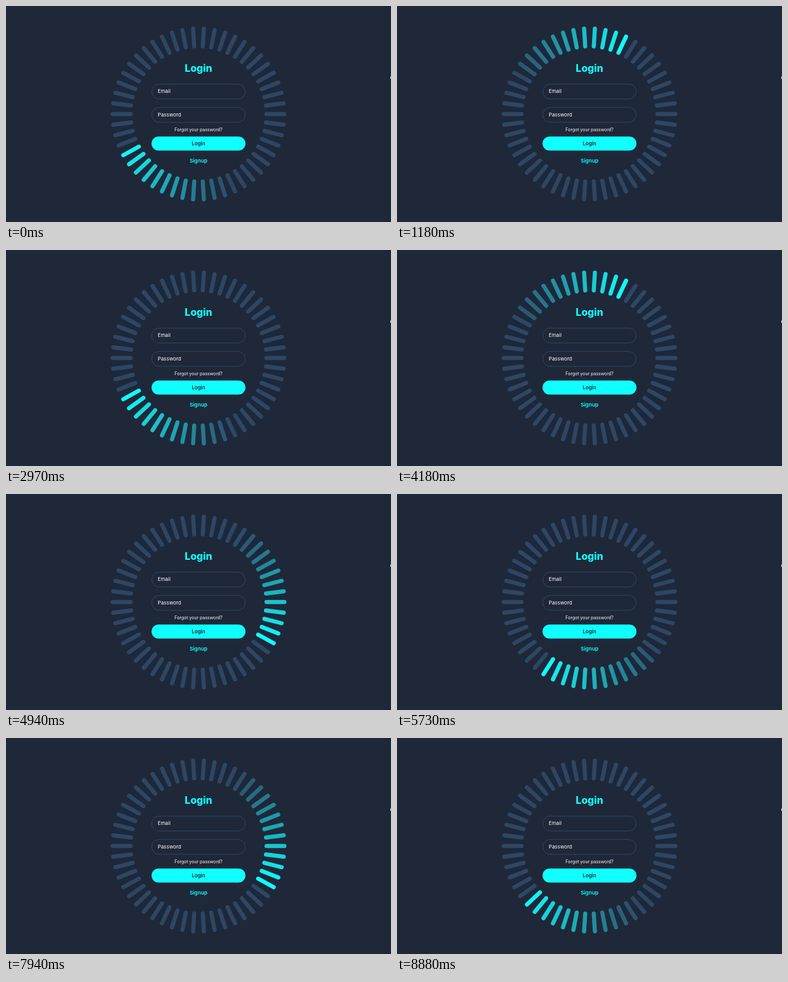
Write an HTML page that moves like this. It is 600x338 px and loops after 8910 ms.

```html
<!DOCTYPE html>
<html lang="en">
<head>
<meta charset="utf-8">
<title>Login</title>
<style>
  html, body { margin: 0; width: 100%; height: 100%; overflow: hidden; background: #1f2838; }
  svg { display: block; width: 100%; height: 100%; }
  text { font-family: Inter, "Open Sans", sans-serif; font-size: 7.9px; fill: #fff; }
  .mid { text-anchor: middle; }
  .title { font-size: 15.6px; font-weight: 800; fill: #10ffff; }
  .field { fill: none; stroke: #2c4766; stroke-width: 1; }
  .hint { font-size: 6.9px; }
  .button { fill: #10ffff; }
  .label { font-size: 7.8px; font-weight: 600; fill: #1f2838; }
  .signup { font-size: 8.2px; font-weight: 600; fill: #10ffff; }
</style>
</head>
<body>
<svg viewBox="0 0 600 338">
  <g id="ring"></g>
  <text class="title mid" x="300" y="103">Login</text>
  <rect class="field" x="227.2" y="122.2" width="145.6" height="23.4" rx="11.7"/>
  <text x="236.4" y="136.3">Email</text>
  <rect class="field" x="227.2" y="158.7" width="145.6" height="23.4" rx="11.7"/>
  <text x="236.4" y="172.8">Password</text>
  <text class="hint mid" x="300" y="196">Forgot your password?</text>
  <rect class="button" x="226.8" y="204.2" width="146.4" height="22" rx="11"/>
  <text class="label mid" x="300" y="217.8">Login</text>
  <text class="signup mid" x="300" y="244.6">Signup</text>
  <ellipse cx="601" cy="112" rx="2" ry="2.8" fill="#fff"/>
</svg>
<script>
  const COUNT = 50;
  const LOOP = 8910;
  const STEP = 60;      // ms for the lead to move by one bar
  const START = 46.75;  // lead position when the loop begins
  const TAIL = 12.5;    // bars until the glow has faded
  const LIT = [16, 255, 255];
  const DIM = [44, 71, 102];

  const ring = document.getElementById("ring");
  const bars = Array.from({ length: COUNT }, (_, i) => {
    const bar = document.createElementNS("http://www.w3.org/2000/svg", "rect");
    const attrs = {
      x: 163, y: 165.8, width: 34.2, height: 6.4, rx: 3.2,
      transform: `rotate(${i * 360 / COUNT} 300 169)`
    };
    for (const name in attrs) bar.setAttribute(name, attrs[name]);
    return ring.appendChild(bar);
  });

  function mix(k) {
    return `rgb(${LIT.map((c, i) => Math.round(c + (DIM[i] - c) * k))})`;
  }

  function draw(time) {
    const lead = START + (time % LOOP) / STEP;
    bars.forEach((bar, i) => {
      const age = (lead - i + COUNT) % COUNT;
      bar.setAttribute("fill", mix(Math.min(age / TAIL, 1)));
    });
  }

  const begin = performance.now();
  function tick() {
    draw(performance.now() - begin);
    requestAnimationFrame(tick);
  }
  tick();
</script>
</body>
</html>
```
